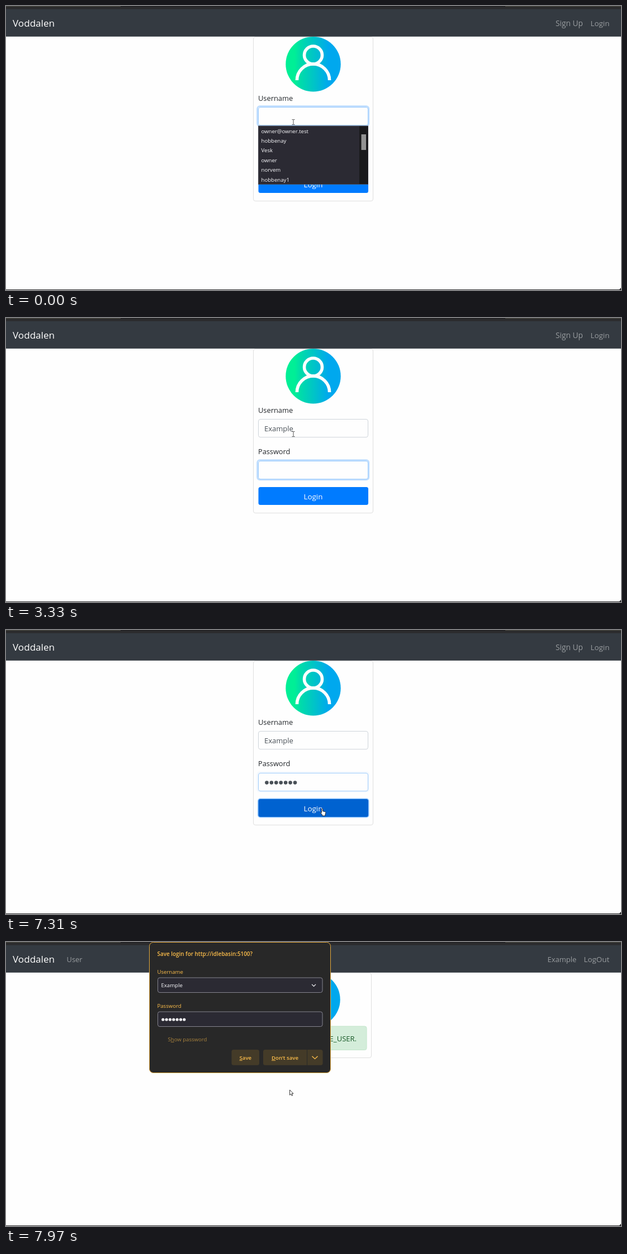
Animation of 1100 by 509 pixels, one loop 8 s. Source, as an HTML page:

```html
<!DOCTYPE html>
<html lang="en">
<head>
<meta charset="utf-8">
<title>Login form</title>
<style>
  html, body { margin: 0; width: 100%; height: 100%; overflow: hidden; background: #fefefe; }
  svg { display: block; width: 100%; height: 100%; font-family: "Open Sans", "Noto Sans", sans-serif; }
  text { white-space: pre; }
  .link { fill: #999da0; font-size: 13.4px; }
  .label { fill: #212529; font-size: 12.85px; }
  .field { fill: #fefefe; stroke: #ced4da; }
  .ring { fill: none; stroke: #007bff; stroke-width: 2.8; }
  .value { fill: #495057; font-size: 13px; }
  .menu { fill: #2b2a33; stroke: #45444e; }
  .menu-text { fill: #fbfbfe; font-size: 9.6px; }
  .gold { fill: #fdbe4b; font-size: 9.6px; }
  .bold { font-weight: 600; }
  .dark-field { fill: #2b2a33; stroke: #85848f; }
  .dark-button { fill: #443b28; }
  .card { fill: #fefefe; stroke: #dfdfdf; }
</style>
</head>
<body>
<svg viewBox="0 0 1100 509">
  <defs>
    <linearGradient id="teal">
      <stop offset=".16" stop-color="#00ef96"/>
      <stop offset=".27" stop-color="#00dcaa"/>
      <stop offset=".55" stop-color="#00c0cc"/>
      <stop offset=".78" stop-color="#00a8ee"/>
    </linearGradient>
    <g id="avatar">
      <circle cx="549.5" cy="104.2" r="49.2" fill="url(#teal)"/>
      <g fill="none" stroke="#fefefe" stroke-width="5.6">
        <circle cx="549.5" cy="88" r="16"/>
        <path d="M520.4 133a29.1 29.1 0 0 1 58.2 0"/>
      </g>
    </g>
    <path id="ibeam" d="M-2.5 -4.5h2l.5 .5l.5 -.5h2M0 -4v8M-2.5 4.5h2l.5 -.5l.5 .5h2" fill="none" stroke="#555"/>
    <path id="arrow" d="M.5 .5v9.3l2.2-2l1.5 3.3l1.5-.7l-1.4-3.2h2.7z" fill="#fff" stroke="#222" stroke-width=".9"/>
    <path id="hand" d="M-1 0q1-1 2 0v4.2l4.5 1q1 .5 .8 1.8l-.9 3.5v2h-5.2v-1.6l-3.2-4q.2-1.3 2 0z"
          fill="#fff" stroke="#222" stroke-width=".9"/>
  </defs>

  <rect width="1100" height="509" fill="#fefefe"/>
  <path d="M0 508.5H1100" stroke="#2b2b2d"/>
  <path d="M1100 505v4h-4z" fill="#2b2b2d"/>

  <g id="navbar">
    <rect y="5" width="1100" height="49.8" fill="#343a41"/>
    <text x="12" y="37" fill="#fff" font-size="17.1">Voddalen</text>
    <g id="guestLinks" class="link">
      <text x="983" y="36" style="font-size:13.7px">Sign Up</text>
      <text x="1045.5" y="36">Login</text>
    </g>
    <g id="userLinks" class="link">
      <text x="108.5" y="36" style="font-size:12.9px">User</text>
      <text x="968.5" y="36" style="font-size:13px">Example</text>
      <text x="1033.5" y="36">LogOut</text>
    </g>
  </g>

  <g id="loginCard">
    <rect class="card" x="442.5" y="55.5" width="214" height="294" rx="3.5"/>
    <use href="#avatar"/>
    <text class="label" x="451" y="169.5">Username</text>
    <rect class="ring" id="nameRing" x="449.6" y="179.6" width="199.2" height="35.4" rx="4.5"/>
    <rect class="field" id="nameField" x="451.5" y="181.5" width="196" height="32.2" rx="3.5"/>
    <text class="value" id="nameText" x="462" y="203"></text>
    <text class="label" x="451" y="244.3" style="font-size:12.75px">Password</text>
    <rect class="ring" id="passRing" x="449.6" y="254.6" width="199.2" height="35.2" rx="4.5"/>
    <rect class="field" id="passField" x="451.5" y="256.5" width="196" height="32.2" rx="3.5"/>
    <g id="passDots" fill="#495057"></g>
    <rect id="caret" width="1" height="19" fill="#495057" opacity=".8"/>
    <rect id="buttonRing" x="451.5" y="303" width="196.5" height="32" rx="3.5" fill="none" stroke="#007bff" stroke-opacity=".4"/>
    <rect id="button" x="451.5" y="303" width="196.5" height="32" rx="3.5"/>
    <text x="549.5" y="325" text-anchor="middle" fill="#fff" font-size="13.4">Login</text>

    <g id="fullMenu">
      <rect class="menu" x="451.5" y="215" width="196" height="104.5"/>
      <rect x="632" y="215.5" width="15.5" height="103.5" fill="#19191b"/>
      <rect x="635.5" y="230" width="8.5" height="28" fill="#929292"/>
      <g id="menuItems" class="menu-text"></g>
    </g>
    <g id="matchMenu">
      <rect class="menu" id="matchRow" x="451.5" y="215" width="196" height="17.5"/>
      <text class="menu-text" x="456.5" y="227.5">Example</text>
    </g>
  </g>

  <g id="userCard">
    <rect class="card" x="445.5" y="55.5" width="208" height="152" rx="3.5"/>
    <use href="#avatar" x="-1" y="-1"/>
    <rect x="454.5" y="151" width="190.5" height="42.5" rx="3.5" fill="#d4edda" stroke="#c3e6cb"/>
    <text x="627" y="178" text-anchor="end" fill="#155724" font-size="13">Logged in as ROLE_USER.</text>
  </g>

  <rect width="1100" height="5.6" fill="#2b2b2d"/>
  <path d="M0 .5H205M893 .5H1100" stroke="#4b4a42"/>
  <path d="M205 .5H893" stroke="#1b1b1d"/>

  <g id="dialog">
    <rect x="256.5" y=".5" width="324" height="234" rx="7" fill="#282828" stroke="#e2a93f"/>
    <text class="gold bold" x="270.5" y="25.3" style="font-size:9.9px">Save login for http://idlebasin:5100?</text>
    <text class="gold" x="270.5" y="56.8">Username</text>
    <rect class="dark-field" x="271.5" y="64" width="294.5" height="26.5" rx="3.5"/>
    <text class="menu-text" x="277.5" y="81">Example</text>
    <path d="M547 75.8l3.5 3.5l3.5-3.5" fill="none" stroke="#fbfbfe" stroke-width="1.2"/>
    <text class="gold" x="270.5" y="117.6">Password</text>
    <rect class="dark-field" x="271.5" y="125" width="294.5" height="26.5" rx="3.5"/>
    <g id="dialogDots" fill="#fbfbfe"></g>
    <text class="gold" x="289.5" y="177.8" opacity=".6">S<tspan text-decoration="underline">h</tspan>ow password</text>
    <rect class="dark-button" x="403.5" y="193" width="49.5" height="27.8" rx="3.5"/>
    <path class="dark-button" d="M463.5 193H538v27.8h-74.5q-3.5 0-3.5-3.5v-20.8q0-3.5 3.5-3.5z"/>
    <path class="dark-button" d="M539 193h24q3.5 0 3.5 3.5v20.8q0 3.5-3.5 3.5h-24z"/>
    <text class="gold bold" x="428.3" y="210.8" text-anchor="middle"><tspan text-decoration="underline">S</tspan>ave</text>
    <text class="gold bold" x="499" y="210.8" text-anchor="middle"><tspan text-decoration="underline">D</tspan>on’t save</text>
    <path d="M547.5 204.8l5 4.6l5-4.6" fill="none" stroke="#fdbe4b" stroke-width="1.4"/>
  </g>

  <g id="status">
    <rect x="-.5" y="491.5" width="228" height="18" fill="#2f2f36" stroke="#45454d"/>
    <text class="menu-text" x="1.5" y="504.3">idlebasin</text>
  </g>

  <use id="pointer"/>
</svg>
<script>
const LOOP = 8000;
const DOT_STEP = 8.43;
const $ = id => document.getElementById(id);

function add(parent, tag, attrs, text = "") {
  const el = document.createElementNS("http://www.w3.org/2000/svg", tag);
  for (const key in attrs) el.setAttribute(key, attrs[key]);
  el.textContent = text;
  parent.append(el);
}

["owner@owner.test", "hobbenay", "Vesk", "owner", "norvem", "hobbenay1"].forEach((name, i) =>
  add($("menuItems"), "text", { x: 456.5, y: 227.5 + i * 17.4 }, name));
for (let i = 0; i < 7; i++) {
  add($("passDots"), "circle", { cx: 466.4 + i * DOT_STEP, cy: 273.6, r: 3.3 });
  add($("dialogDots"), "circle", { cx: 280.8 + i * 6.33, cy: 139, r: 2.6 });
}

const start = {
  nav: "guest", card: "login", name: "", dots: 0, caret: false, menu: "full", picked: false,
  nameFocus: 1, passFocus: 0, button: "#007bff", buttonFocus: 0,
  dialog: 0, status: false, pointer: ["ibeam", 514, 208]
};

// Each step holds only what changes at that time.
const steps = [
  [400, { caret: true }],
  [550, { name: "E" }],
  [670, { menu: "match" }],
  [950, { name: "Ex" }],
  [1070, { name: "Exa" }],
  [1190, { name: "Exam" }],
  [1310, { name: "Exampl" }],
  [1460, { name: "Example", caret: false }],
  [2020, { caret: true }],
  [2140, { picked: true }],
  [2410, { menu: "none" }],
  [2530, { caret: false }],
  [2780, { nameFocus: .5, passFocus: .6, caret: true }],
  [2900, { nameFocus: 0, passFocus: 1 }],
  [3330, { caret: false }],
  [3610, { dots: 1, caret: true }],
  [3730, { dots: 2 }],
  [3850, { caret: false }],
  [4130, { dots: 3, caret: true }],
  [4250, { dots: 4 }],
  [4370, { dots: 5 }],
  [4490, { dots: 6 }],
  [4640, { dots: 7 }],
  [4920, { caret: false }],
  [5480, { caret: true }],
  [5980, { caret: false }],
  [6380, { pointer: ["ibeam", 518, 213] }],
  [6500, { pointer: ["arrow", 533, 235], caret: true }],
  [6650, { pointer: ["ibeam", 560, 269] }],
  [6770, { pointer: ["ibeam", 574, 284] }],
  [6920, { pointer: ["hand", 569, 314], button: "#0072ec" }],
  [7040, { pointer: ["hand", 565.5, 320.5], button: "#0069d9", caret: false }],
  [7190, { passFocus: .6, button: "#0065d2", buttonFocus: .4 }],
  [7310, { passFocus: .15, button: "#0062d0", buttonFocus: .8 }],
  [7460, { card: "user", status: true, dialog: .5, pointer: ["arrow", 565, 320] }],
  [7580, { nav: "none", card: "none", dialog: 1 }],
  [7700, { nav: "user" }],
  [7850, { card: "user", status: false, pointer: ["arrow", 540, 298] }],
  [7970, { pointer: ["arrow", 507, 264.5] }]
];

const show = (id, on) => $(id).setAttribute("display", on ? "inline" : "none");
const set = (id, key, value) => $(id).setAttribute(key, value);

function focus(prefix, amount) {
  set(prefix + "Ring", "stroke-opacity", .25 * amount);
  $(prefix + "Field").style.stroke = amount ? "#9dcbfb" : "";
}

function draw(s) {
  show("navbar", s.nav !== "none");
  show("guestLinks", s.nav === "guest");
  show("userLinks", s.nav === "user");
  show("loginCard", s.card === "login");
  show("userCard", s.card === "user");
  show("fullMenu", s.menu === "full");
  show("matchMenu", s.menu === "match");
  $("matchRow").style.fill = s.picked ? "#45444f" : "";
  set("dialog", "opacity", s.dialog);
  show("status", s.status);

  focus("name", s.nameFocus);
  focus("pass", s.passFocus);
  $("nameText").textContent = s.name;
  [...$("passDots").children].forEach((dot, i) =>
    dot.setAttribute("display", i < s.dots ? "inline" : "none"));

  const inName = s.nameFocus > s.passFocus;
  const typed = inName ? (s.name ? $("nameText").getComputedTextLength() : 0) : s.dots * DOT_STEP;
  show("caret", s.caret);
  set("caret", "x", Math.round(462 + typed));
  set("caret", "y", inName ? 188 : 263);

  set("button", "fill", s.button);
  set("buttonRing", "stroke-width", 4 * s.buttonFocus);
  const [shape, x, y] = s.pointer;
  set("pointer", "href", "#" + shape);
  set("pointer", "transform", `translate(${x} ${y})`);
}

let drawn = -1;
function tick() {
  const t = performance.now() % LOOP;
  const past = steps.filter(([at]) => at <= t);
  if (past.length !== drawn) {
    drawn = past.length;
    draw(Object.assign({}, start, ...past.map(([, change]) => change)));
  }
  requestAnimationFrame(tick);
}
tick();
</script>
</body>
</html>
```
